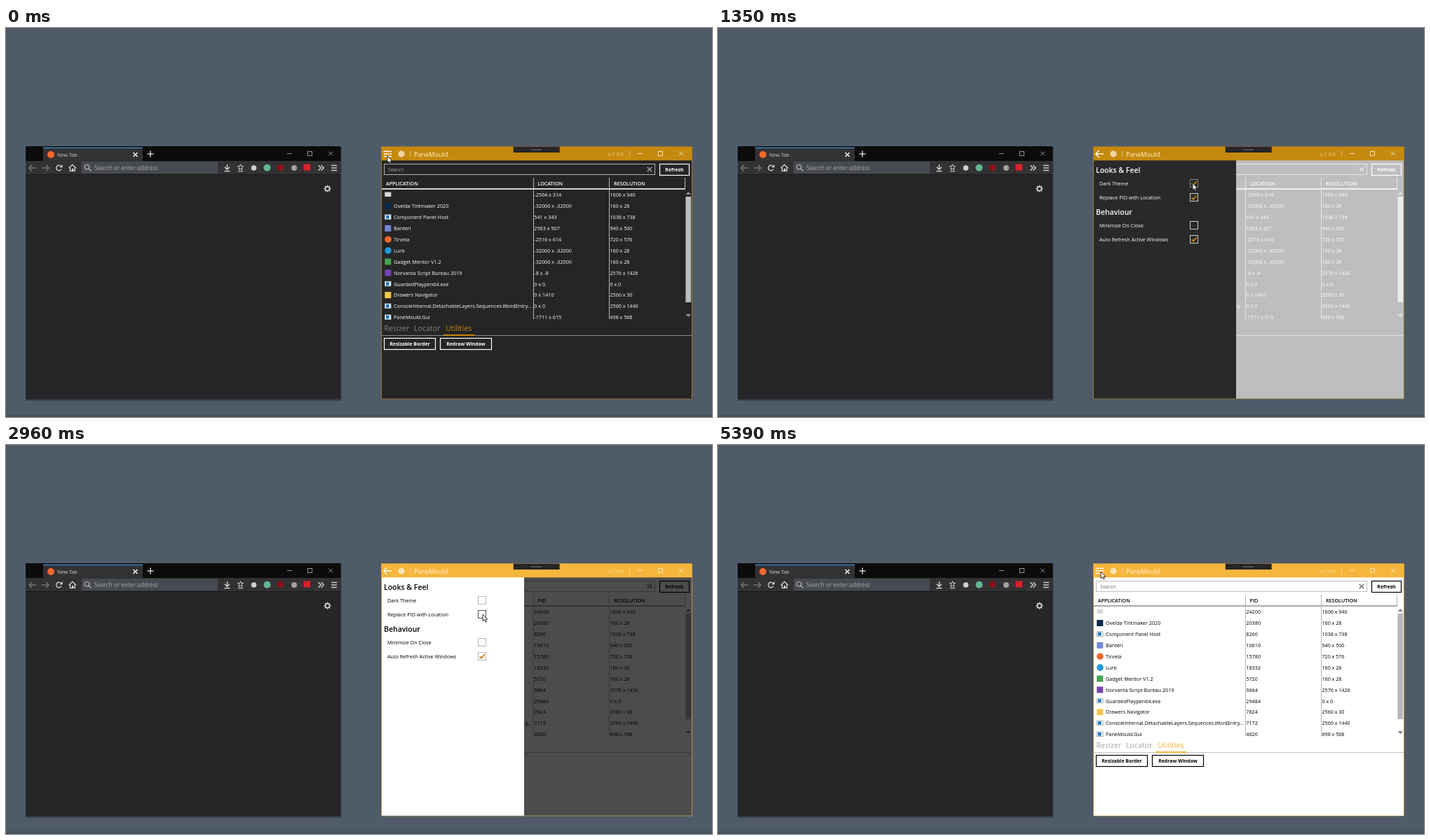
An HTML page with a canvas for the animation above (8 s loop, 1007 by 556 pixels).

```html
<!DOCTYPE html>
<html lang="en">
<head>
<meta charset="utf-8">
<title>Window tool settings</title>
<style>
html, body { margin: 0; width: 100%; height: 100%; overflow: hidden; background: #4f5b69; }
canvas { display: block; }
</style>
</head>
<body>
<canvas id="stage" width="1007" height="556"></canvas>
<script>
const ctx = document.getElementById('stage').getContext('2d');
const LOOP = 8000;
const HAIR = .635;
const WIN = { x: 535.4, y: 169.6, w: 443.2, h: 360.7 };

const DARK = { body: '#252525', drawer: '#292929', bar: '#c6890f', ink: '#fff', veil: 'rgba(255,255,255,.7)',
  hint: '#a0a0a0', field: '#b4b4b4', rule: '#d2d2d2', column: '#b4b4b4', divider: '#8c8c8c', thumb: '#bcbcbc',
  arrow: '#989898', tab: '#858585', box: '#d0d0d0', boxHover: '#858585', tick: '#c6890f', barInk: '#fff3da' };
const LIGHT = { body: '#fff', drawer: '#fff', bar: '#f6b53b', ink: '#000', veil: 'rgba(0,0,0,.7)',
  hint: '#6e6e6e', field: '#bdbdbd', rule: '#ababab', column: '#b8b8b8', divider: '#c0c0c0', thumb: '#b7b7b7',
  arrow: '#828282', tab: '#a6a6a6', box: '#b9b9b9', boxHover: '#555', tick: '#bd7a0c', barInk: '#fff6e2' };

// name, icon kind, icon colour, location, pid, resolution
const ROWS = [
  ['', 'screen', '#d8d8d8', '-2564 x 314', 24200, '1606 x 940'],
  ['Ovelda Tintmaker 2020', 'square', '#07294a', '-32000 x -32000', 20380, '160 x 28'],
  ['Component Panel Host', 'app', '', '541 x 343', 8260, '1038 x 738'],
  ['Banteri', 'square', '#7289da', '2563 x 907', 10616, '940 x 500'],
  ['Tirvela', 'circle', '#f5682c', '-2516 x 614', 15780, '720 x 576'],
  ['Lurb', 'circle', '#2099dc', '-32000 x -32000', 18332, '160 x 28'],
  ['Gadget Mentor V1.2', 'square', '#46a352', '-32000 x -32000', 5720, '160 x 28'],
  ['Norvanta Script Bureau 2019', 'square', '#7546b4', '-8 x -8', 9664, '2576 x 1426'],
  ['GuardedPlaypen64.exe', 'app', '', '0 x 0', 29484, '0 x 0'],
  ['Drawers Navigator', 'square', '#f3c64c', '0 x 1410', 7824, '2560 x 30'],
  ['ConsoleInternal.DetachableLayers.Sequences.WordEntry...', 'app', '', '0 x 0', 7172, '2560 x 1440'],
  ['PaneMould.Gui', 'app', '', '-1711 x 615', 4620, '698 x 568']
];

const POINTER = [[0, 544, 183], [300, 545, 182], [420, 551, 179], [540, 560, 177], [690, 593, 190],
  [810, 634, 209], [960, 658, 219], [1110, 668, 222], [1230, 675, 222], [1350, 677, 222],
  [2150, 680, 225], [2300, 684, 232], [2420, 684, 238], [2570, 682, 241], [2690, 680, 242],
  [3390, 650, 227], [3510, 607, 210], [3660, 590, 202], [3780, 578, 196], [3930, 562, 188],
  [4050, 551, 183], [4170, 548, 181], [4320, 547, 181], [5390, 546, 181]];
const DRAWER = [[0, null], [150, -45], [300, -12], [420, -3], [540, 0], [4720, null]];
const MENU = [[0, 0], [150, .2], [300, .75], [420, .96], [540, 1], [4720, .8], [4870, .2], [4990, 0]];
const at = (steps, t) => steps.findLast(s => s[0] <= t).slice(1);

function rect(x, y, w, h, color) {
  ctx.fillStyle = color;
  ctx.fillRect(x, y, w, h);
}
function frame(x, y, w, h, color, width = 1) {
  ctx.strokeStyle = color;
  ctx.lineWidth = width;
  ctx.strokeRect(x + .5, y + .5, w - 1, h - 1);
}
function line(color, width, ...xy) {
  ctx.strokeStyle = color;
  ctx.lineWidth = width;
  ctx.beginPath();
  for (let i = 0; i < xy.length; i += 2) ctx.lineTo(xy[i], xy[i + 1]);
  ctx.stroke();
}
function polygon(color, ...xy) {
  ctx.fillStyle = color;
  ctx.beginPath();
  for (let i = 0; i < xy.length; i += 2) ctx.lineTo(xy[i], xy[i + 1]);
  ctx.closePath();
  ctx.fill();
}
function disc(x, y, r, color) {
  ctx.fillStyle = color;
  ctx.beginPath();
  ctx.arc(x, y, r, 0, 7);
  ctx.fill();
}
function arc(x, y, r, from, to, color, width = 1.2) {
  ctx.strokeStyle = color;
  ctx.lineWidth = width;
  ctx.beginPath();
  ctx.arc(x, y, r, from, to);
  ctx.stroke();
}
function text(str, x, y, color, size = 7.25, weight = 500, align = 'left') {
  ctx.font = `${weight} ${size}px "Open Sans", "Noto Sans", sans-serif`;
  ctx.textAlign = align;
  ctx.fillStyle = color;
  ctx.fillText(str, x, y);
}
function cross(x, y, r, color, width = 1) {
  line(color, width, x - r, y - r, x + r, y + r);
  line(color, width, x + r, y - r, x - r, y + r);
}
function clip(x, y, w, h, draw) {
  ctx.save();
  ctx.beginPath();
  ctx.rect(x, y, w, h);
  ctx.clip();
  draw();
  ctx.restore();
}
function windowControls(x, y, color) {
  line(color, .8, x - 33, y + .5, x - 26, y + .5);
  frame(x - 4, y - 3, 7, 7, color, .8);
  cross(x + 29, y + .5, 3, color, .8);
}
function bars(x, y, color) {
  for (const dy of [-3.5, 0, 3.5]) line(color, 1.3, x - 4, y + dy, x + 4, y + dy);
}

function drawBrowser() {
  const ink = '#dededf', faint = '#7b7b7e';
  rect(28, 530.7, 450.5, 2, 'rgba(0,0,0,.32)');
  rect(477, 171, 1.5, 360, 'rgba(0,0,0,.28)');
  rect(28, 169, 449.3, 361.7, '#262628');
  rect(28, 169, 449.3, 21, '#0b0b0c');
  rect(53, 170.7, 142, 19.3, '#323234');
  rect(53, 170.7, 142, 2 * HAIR, '#3f8fd8');
  rect(28, 190, 449.3, 20, '#323234');
  rect(28, 209.3, 449.3, HAIR, '#0b0b0c');
  rect(108, 191, 194, 17, '#474a52');

  disc(64, 181, 5, '#f5682c');
  text('New Tab', 73, 183.7, '#d2d2d4', 7.25, 400);
  cross(184.5, 181, 3, '#fff', 1.4);
  line(ink, 1.4, 201.5, 180, 210.5, 180);
  line(ink, 1.4, 206, 175.5, 206, 184.5);
  windowControls(434, 179, '#b5b5b6');

  for (const [x, d] of [[38, 1], [56, -1]]) {
    line(faint, 1.3, x - 5 * d, 200, x + 5 * d, 200);
    line(faint, 1.3, x - d, 195.8, x - 5 * d, 200, x - d, 204.2);
  }
  arc(75.5, 200, 3.7, .5, 5.3, ink, 1.4);
  polygon(ink, 80.5, 195, 80.5, 199.2, 76.3, 199.2);
  line(ink, 1.3, 89.7, 200.2, 94.8, 195.3, 99.9, 200.2);
  line(ink, 1.3, 91.5, 199.5, 91.5, 204.3, 98.1, 204.3, 98.1, 199.5);
  rect(94, 201, 2, 3, ink);
  arc(115.5, 198.7, 3.2, 0, 7, '#b9b9bd');
  line('#b9b9bd', 1.3, 117.8, 201, 121.5, 204.7);
  text('Search or enter address', 126, 203.2, '#a9a9ae', 8.2, 400);

  line(ink, 1.3, 315.5, 195, 315.5, 202);
  line(ink, 1.3, 312, 198.7, 315.5, 202.3, 319, 198.7);
  line(ink, 1.3, 311.5, 204.6, 319.5, 204.6);
  const star = [];
  for (let i = 0; i <= 10; i++) {
    const a = i * Math.PI / 5 - Math.PI / 2, r = i % 2 ? 2 : 4.2;
    star.push(334.5 + r * Math.cos(a), 199 + r * Math.sin(a));
  }
  line(ink, 1, ...star);
  line(ink, 1.1, 331, 204.6, 338, 204.6);
  disc(353.5, 200, 3.8, '#cfcfd1');
  disc(372.5, 199.7, 5, '#63b692');
  disc(391.5, 199.7, 4.6, '#8e1219');
  disc(411, 200, 4, '#a99da5');
  rect(424.5, 194.5, 9.5, 9, '#d5222c');
  for (const x of [445.5, 449.5]) line(ink, 1.3, x, 196.3, x + 3.7, 200, x, 203.7);
  bars(468, 200, ink);

  arc(458.5, 229.7, 2.9, 0, 7, ink, 1.4);
  for (let i = 0; i < 8; i++) {
    const c = Math.cos(i * Math.PI / 4), s = Math.sin(i * Math.PI / 4);
    line(ink, 1.5, 458.5 + 3.2 * c, 229.7 + 3.2 * s, 458.5 + 5 * c, 229.7 + 5 * s);
  }
}

function rowIcon(kind, color, y) {
  if (kind === 'circle') disc(545, y, 4.8, color);
  else if (kind === 'square') rect(540.3, y - 4.5, 9, 9, color);
  else if (kind === 'screen') rect(540.3, y - 4, 9, 6.5, color);
  else {
    rect(540, y - 4, 9.5, 7.5, '#9eacb8');
    rect(541, y - 3, 7.5, 5.5, '#fff');
    rect(542, y - 2.5, 4.5, 4.5, '#1672c4');
  }
}

function button(label, x, y, w, theme) {
  frame(x, y, w, 17, theme.ink, 1.2);
  text(label, x + w / 2, y + 11.2, theme.ink, 6.9, 700, 'center');
}

function drawMainPage(theme, showPid) {
  frame(539, 194, 387, 16, theme.field);
  text('Search', 545, 205, theme.hint, 7.1, 400);
  cross(918, 202, 3.3, theme.hint, 1.5);
  button('Refresh', 932, 194, 43, theme);

  text('APPLICATION', 542, 224.7, theme.ink, 7.15, 600);
  text(showPid ? 'PID' : 'LOCATION', 758.5, 224.7, theme.ink, 7.15, 600);
  text('RESOLUTION', 867, 224.7, theme.ink, 7.15, 600);
  rect(536, 229, 433, 2, theme.rule);
  for (const x of [752, 860]) rect(x, 214, 1, 202, theme.column);
  rect(968, 214, 1, 16, theme.column);

  clip(536, 231, 432, 186, () => ROWS.forEach(([name, kind, color, location, pid, size], i) => {
    const y = 238.6 + i * 15.9;
    rowIcon(kind, color, y);
    clip(553, 231, 198, 186, () => text(name, 553, y + 2.7, theme.ink));
    text(showPid ? pid : location, 753.3, y + 2.7, theme.ink);
    text(size, 861.5, y + 2.7, theme.ink, 7.15);
  }));

  polygon(theme.arrow, 969.5, 238, 973.3, 234, 977, 238);
  rect(969.4, 241, 7.8, 151, theme.thumb);
  polygon(theme.arrow, 969.5, 409, 977, 409, 973.3, 413);

  text('Resizer', 539.5, 432.8, theme.tab, 10.7, 400);
  text('Locator', 582, 432.8, theme.tab, 10.7, 400);
  text('Utilities', 627, 432.8, theme.bar, 10.8, 400);
  rect(536, 439, 442, 1, theme.divider);
  rect(624, 438, 44, 2, theme.bar);
  button('Resizable Border', 539, 443, 74, theme);
  button('Redraw Window', 619, 443, 74, theme);
}

function drawDrawer(theme, shift, options, px, py) {
  rect(536, 189, 442, 341, theme.veil);
  clip(536, 189, 203 + shift, 341, () => {
    rect(536, 189, 203, 341, theme.drawer);
    text('Looks & Feel', 539 + shift, 207.3, theme.ink, 10.5, 600);
    text('Behaviour', 539 + shift, 267.3, theme.ink, 10.5, 600);
    for (const [label, y, checked] of options) {
      text(label, 544 + shift, y + 2.8, theme.ink);
      const x = 679 + shift;
      const hover = Math.abs(px - x) < 6 && Math.abs(py - y) < 6;
      frame(x - 6, Math.round(y - 6), 12, 12, hover ? theme.boxHover : theme.box);
      if (checked) line(theme.tick, 1.7, x - 3.3, y, x - .9, y + 2.6, x + 3.6, y - 2.8);
    }
  });
}

// Three bars that turn half round while the outer two become an arrow head.
function drawMenuIcon(p) {
  ctx.save();
  ctx.translate(544.3, 180);
  ctx.rotate(-Math.PI * p);
  const mix = (a, b) => a + (b - a) * p;
  line('#fff', 1.4, -5.8, 0, 5.8, 0);
  for (const side of [-1, 1])
    line('#fff', 1.4, mix(-5.8, .7), side * mix(3.6, 4.9), mix(5.8, 5.6), side * mix(3.6, 0));
  ctx.restore();
}

function drawTitleBar(theme, menu) {
  rect(WIN.x, WIN.y, WIN.w, 19.7, theme.bar);
  drawMenuIcon(menu);
  ctx.globalAlpha = .72;
  disc(564, 180, 4.6, theme.barInk);
  ctx.globalAlpha = .4;
  rect(576, 175, 1, 10, '#fff');
  rect(889, 175, 1, 10, '#fff');
  ctx.globalAlpha = 1;
  text('PaneMould', 582, 183.5, theme.barInk, 9.1, 400);
  ctx.globalAlpha = .72;
  text('v:1.0.0', 859, 182.8, theme.barInk, 7.25, 400);
  ctx.globalAlpha = 1;
  windowControls(934, 179, theme.barInk);
}

function drawPointer(x, y) {
  ctx.save();
  ctx.translate(x, y);
  const shape = [0, 0, 0, 9.6, 2.2, 7.6, 3.8, 11, 5.4, 10.3, 3.9, 7.1, 6.8, 7];
  polygon('#fff', ...shape);
  line('#000', .8, ...shape, 0, 0);
  ctx.restore();
}

function draw(t) {
  const light = t >= 1780, showPid = t >= 2840;
  const theme = light ? LIGHT : DARK;
  const [px, py] = at(POINTER, t), [shift] = at(DRAWER, t), [menu] = at(MENU, t);

  rect(0, 0, 1007, 556, '#4f5b69');
  rect(0, 552, 1007, 4, '#47525e');
  drawBrowser();

  // The border shows around the slightly smaller body.
  rect(WIN.x, WIN.y, WIN.w, WIN.h, theme.bar);
  clip(WIN.x + HAIR, WIN.y + HAIR, WIN.w - 2 * HAIR, WIN.h - 2 * HAIR, () => {
    rect(535, 169, 445, 363, theme.body);
    drawMainPage(theme, showPid);
    if (shift !== null) drawDrawer(theme, shift, [
      ['Dark Theme', 222, !light],
      ['Replace PID with Location', 242.3, !showPid],
      ['Minimize On Close', 281.7, false],
      ['Auto Refresh Active Windows', 302, true]
    ], px, py);
  });
  drawTitleBar(theme, menu);

  rect(723.7, WIN.y, 66, 8.4, '#252527');
  rect(749, 173, 15, 2, '#505052');
  drawPointer(px, py);
}

function tick() {
  draw(performance.now() % LOOP);
  requestAnimationFrame(tick);
}
tick();
</script>
</body>
</html>
```
